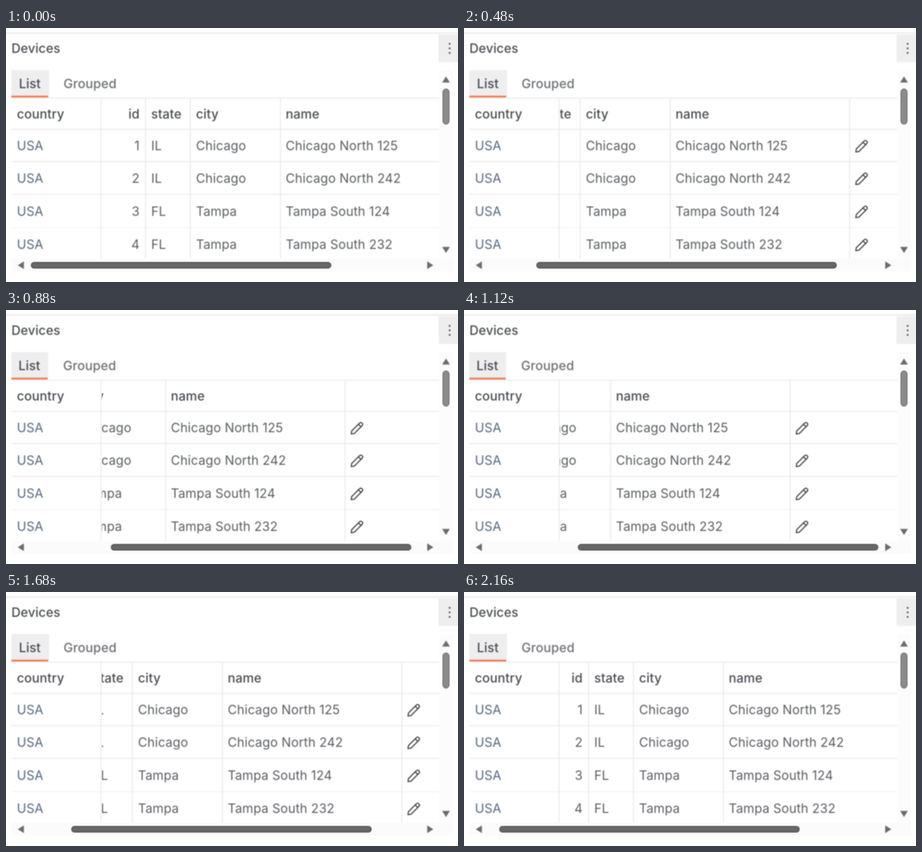
These frames come from a looping animation (998x561 px, 2240 ms). An HTML page with a canvas:

```html
<!DOCTYPE html>
<html lang="en">
<head>
<meta charset="utf-8">
<title>Devices</title>
<style>
  html, body { margin: 0; width: 100%; height: 100%; overflow: hidden; background: #fff; }
  canvas { display: block; width: 998px; height: 561px; }
</style>
</head>
<body>
<canvas id="stage" width="998" height="561"></canvas>
<script>
const ctx = document.getElementById('stage').getContext('2d');
const LOOP = 2240, STEP = 80;
const LEFT = 12, PIN = 210, RIGHT = 957, TOP = 155, BOTTOM = 510;
const LINE = '#e9e9ea', HEAD = '#484a50', BODY = '#5a5c62';

// Horizontal scroll position over time: [ms, px]
const KEYS = [[160, 0], [320, 89], [640, 197], [1120, 282], [1520, 199], [1840, 66], [2160, 33]];
const ROWS = [
  ['IL', 'Chicago', 'Chicago North 125'],
  ['IL', 'Chicago', 'Chicago North 242'],
  ['FL', 'Tampa', 'Tampa South 124'],
  ['FL', 'Tampa', 'Tampa South 232']
];
const BASE = [270, 342, 415, 488];
const COL_X = [320.5, 419.5, 617.5];

const slope = i => (KEYS[i + 1][1] - KEYS[i][1]) / (KEYS[i + 1][0] - KEYS[i][0]);

function tangent(i) {
  if (i === 0) return slope(0);
  if (i === KEYS.length - 1) return slope(i - 1);
  const a = slope(i - 1), b = slope(i);
  return a * b <= 0 ? 0 : 2 * a * b / (a + b);
}

// Monotone cubic through the keys
function scrollAt(t) {
  if (t <= KEYS[0][0]) return 0;
  let i = 0;
  while (i < KEYS.length - 2 && t > KEYS[i + 1][0]) i++;
  const [t0, y0] = KEYS[i], [t1, y1] = KEYS[i + 1];
  const h = t1 - t0, u = Math.min(1, (t - t0) / h), v = 1 - u;
  return y0 * (1 + 2 * u) * v * v + y1 * u * u * (3 - 2 * u)
    + h * (tangent(i) * u * v * v - tangent(i + 1) * u * u * v);
}

function box(x, y, w, h, color) {
  ctx.fillStyle = color;
  ctx.fillRect(x, y, w, h);
}

function text(str, x, y, color, weight = 400, align = 'left') {
  ctx.font = `${weight} 28px Inter, "Open Sans", sans-serif`;
  ctx.letterSpacing = '0.15px';
  ctx.textAlign = align;
  ctx.fillStyle = color;
  ctx.fillText(str, x, y);
}

function pill(x, y, w, h, fill, edge) {
  ctx.beginPath();
  ctx.roundRect(x + 1, y + 1, w - 2, h - 2, Math.min(w, h) / 2 - 1);
  ctx.fillStyle = fill;
  ctx.fill();
  ctx.strokeStyle = edge;
  ctx.lineWidth = 2;
  ctx.stroke();
}

function arrow(x, y, turns) {
  ctx.save();
  ctx.translate(x, y);
  ctx.rotate(turns * Math.PI / 2);
  ctx.beginPath();
  ctx.moveTo(0, -7);
  ctx.lineTo(8.5, 6.5);
  ctx.lineTo(-8.5, 6.5);
  ctx.closePath();
  ctx.fillStyle = '#6c6c6c';
  ctx.fill();
  ctx.restore();
}

function pencil(x, y) {
  ctx.save();
  ctx.translate(x, y);
  ctx.rotate(-Math.PI / 4);
  ctx.beginPath();
  ctx.moveTo(-17.5, 0);
  ctx.lineTo(-12, -4);
  ctx.lineTo(12, -4);
  ctx.quadraticCurveTo(16.5, -4, 16.5, 0);
  ctx.quadraticCurveTo(16.5, 4, 12, 4);
  ctx.lineTo(-12, 4);
  ctx.closePath();
  ctx.moveTo(9, -4);
  ctx.lineTo(9, 4);
  ctx.strokeStyle = '#434345';
  ctx.lineWidth = 2.5;
  ctx.lineJoin = 'round';
  ctx.stroke();
  ctx.restore();
}

function header(shift) {
  box(-9, 9, 1016, 4, '#efefef');
  text('Devices', 12, 55, HEAD, 450);
  box(955, 14, 52, 61, '#eeeeee');
  ctx.fillStyle = '#4c4d50';
  for (const y of [35, 45, 55]) {
    ctx.beginPath();
    ctx.arc(979.5, y, 2.1, 0, 7);
    ctx.fill();
  }
  box(LEFT, 93, 83 - shift * 2, 60, '#eeeeef');
  box(LEFT, 149.5, 81 - shift, 4.5, '#f27a50');
  text('List', 28.5 - shift, 133, HEAD, 500);
  text('Grouped', 127 - shift, 133, '#6d6f74', 450);
}

function table(scroll) {
  for (const y of [155, 224, 295, 367.5]) box(LEFT, y - 1, RIGHT - LEFT, 2, LINE);
  box(LEFT, 440, RIGHT - LEFT, 2, '#f4f4f4');

  ctx.save();
  ctx.beginPath();
  ctx.rect(PIN + 1, TOP, RIGHT - PIN - 1, BOTTOM - TOP);
  ctx.clip();
  ctx.translate(-scroll, 0);
  for (const x of [308, 407, 606, 1002]) box(x - 1, TOP, 2, BOTTOM - TOP, LINE);
  text('id', 295, 200, HEAD, 450, 'right');
  ['state', 'city', 'name'].forEach((name, i) => text(name, COL_X[i], 200, HEAD, 450));
  ROWS.forEach((row, r) => {
    text(String(r + 1), 295, BASE[r], BODY, 400, 'right');
    row.forEach((cell, i) => text(cell, COL_X[i], BASE[r], BODY));
    pencil(1028, BASE[r] - 8.5);
  });
  ctx.restore();

  box(PIN - 1, TOP, 2, BOTTOM - TOP, LINE);
  text('country', 24, 200, HEAD, 450);
  for (const y of BASE) text('USA', 24, y, '#54677d');
}

function scrollbars(scroll) {
  box(RIGHT, 93, 30, 417, '#fcfcfc');
  box(LEFT, BOTTOM, 975, 28, '#fbfbfb');
  arrow(971.5, 114, 0);
  arrow(971.5, 490, 2);
  arrow(33, 524, 3);
  arrow(936.5, 524, 1);
  pill(964, 134, 15, 79, '#8c8c8c', '#636363');
  pill(55 + scroll * 0.697, 517, 663, 14, '#686868', '#3c3c3c');
}

function draw(t) {
  const scroll = scrollAt(t);
  ctx.filter = 'none';
  box(0, 0, 998, 561, '#fff');
  ctx.filter = 'blur(0.9px)';
  header(t >= 800 && t < 1400 ? 1 : 0);
  table(scroll);
  scrollbars(scroll);
}

let start, last = -1;
function tick(now) {
  start ??= now;
  const t = Math.floor((now - start) % LOOP / STEP) * STEP;
  if (t !== last) draw(last = t);
  requestAnimationFrame(tick);
}
requestAnimationFrame(tick);
</script>
</body>
</html>
```
